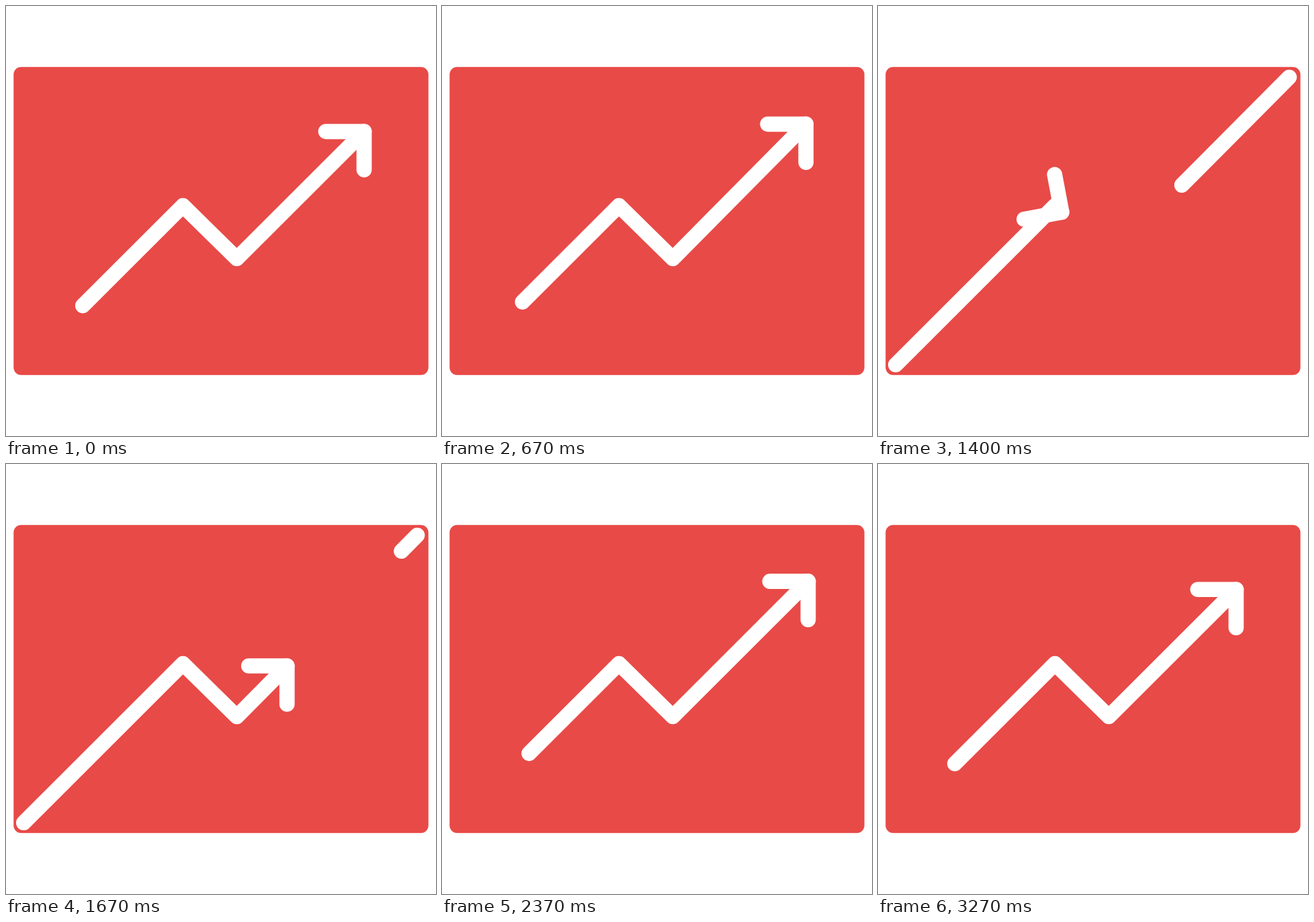
An HTML page that plays this animation: 640x640 px, repeating every 3.33 s.

```html
<!DOCTYPE html>
<html lang="en">
<head>
<meta charset="utf-8">
<title>Trend arrow</title>
<style>
  html, body { margin: 0; width: 100%; height: 100%; overflow: hidden; background: #fff; }
  svg { display: block; width: 100%; height: 100%; }
  .ink path { fill: none; stroke: #fff; stroke-width: 22.7; stroke-linecap: round; stroke-linejoin: round; }
</style>
</head>
<body>
<svg viewBox="0 0 640 640">
  <rect x="11.3" y="90.7" width="617.4" height="458.6" rx="11.3" fill="#e84a47"/>
  <g class="ink">
    <path id="outLine"/><path id="outTip"/>
    <path id="inLine"/><path id="inTip"/>
  </g>
</svg>
<script>
const LOOP = 3330;
const ROUTE = [[26.3, 534], [263.3, 297.2], [343.5, 376], [612, 106]];
const ARM = 57;
const REST = { tail: 124.4, head: 716.2 };

// Distance along the route at each corner
const marks = [0];
for (let i = 1; i < ROUTE.length; i++) {
  marks.push(marks[i - 1] + Math.hypot(ROUTE[i][0] - ROUTE[i - 1][0], ROUTE[i][1] - ROUTE[i - 1][1]));
}
const END = marks[3];

const el = id => document.getElementById(id);
const outLine = el('outLine'), outTip = el('outTip');
const inLine = el('inLine'), inTip = el('inTip');

const clamp = v => Math.min(1, Math.max(0, v));
const mix = (a, b, k) => a + (b - a) * k;
const mixPoint = (p, q, k) => [mix(p[0], q[0], k), mix(p[1], q[1], k)];
const smooth = u => u * u * (3 - 2 * u);

// Ease with handles (x1, 0) and (x2, 1)
function ease(t, from, to, x1 = 1 / 3, x2 = 2 / 3) {
  const x = clamp((t - from) / (to - from));
  let lo = 0, hi = 1;
  for (let i = 0; i < 30; i++) {
    const u = (lo + hi) / 2, v = 1 - u;
    if (3 * v * v * u * x1 + 3 * v * u * u * x2 + u * u * u < x) lo = u; else hi = u;
  }
  return smooth((lo + hi) / 2);
}

function pointAt(d) {
  let i = 1;
  while (i < 3 && d > marks[i]) i++;
  return mixPoint(ROUTE[i - 1], ROUTE[i], clamp((d - marks[i - 1]) / (marks[i] - marks[i - 1])));
}

function drawLine(node, tail, head, tip) {
  const corners = ROUTE.filter((p, i) => marks[i] > tail && marks[i] < head);
  node.setAttribute('d', 'M' + [pointAt(tail), ...corners, tip].map(p => p.map(n => n.toFixed(2))).join('L'));
}

function drawTip(node, [x, y], arm, angle) {
  node.setAttribute('d', `M${-arm} 0H0V${arm}`);
  node.setAttribute('transform', `translate(${x} ${y}) rotate(${angle})`);
}

function show(visible, ...nodes) {
  for (const n of nodes) n.style.display = visible ? '' : 'none';
}

// Pull back, then shoot out through the top right corner
function drawLeaving(t) {
  show(t < 1807, outLine);
  show(t < 1040, outTip);
  const back = ease(t, 0, 408);
  const run = ease(t, 408, 1807, .5, .75);
  const tail = mix(mix(REST.tail, 96.4, back), END, run);
  const pulled = mixPoint([533, 186.8], [517, 200.7], back);
  const out = ease(t, 408, 1030, .5, .75);
  const tip = mixPoint(pulled, [613.7, 103.3], out);
  drawLine(outLine, tail, END, t < 1040 ? tip : ROUTE[3]);
  drawTip(outTip, tip, ARM * (1 - ease(t, 700, 1030)), 0);
}

// Follow the route from the bottom left, overshoot and settle
function drawArriving(t) {
  show(t >= 801, inLine);
  show(t >= 950, inTip);
  const settle = ease(t, 2197, 3300, .1, .05);
  const head = mix(746.9 * ease(t, 801, 2197, .27, .6), REST.head, settle);
  const tail = mix(163.5 * ease(t, 1670, 2197, .333, .48), REST.tail, settle);
  const tip = pointAt(head);
  tip[1] += 1.6 * clamp((t - 1670) / 330) - .3;
  const turn = corner => smooth(clamp((head - corner + 25) / 50));
  drawLine(inLine, tail, head, tip);
  drawTip(inTip, tip, ARM * ease(t, 950, 1283), 90 * (turn(marks[1]) - turn(marks[2])));
}

function frame() {
  const t = performance.now() % LOOP;
  drawLeaving(t);
  drawArriving(t);
  requestAnimationFrame(frame);
}
frame();
</script>
</body>
</html>
```
